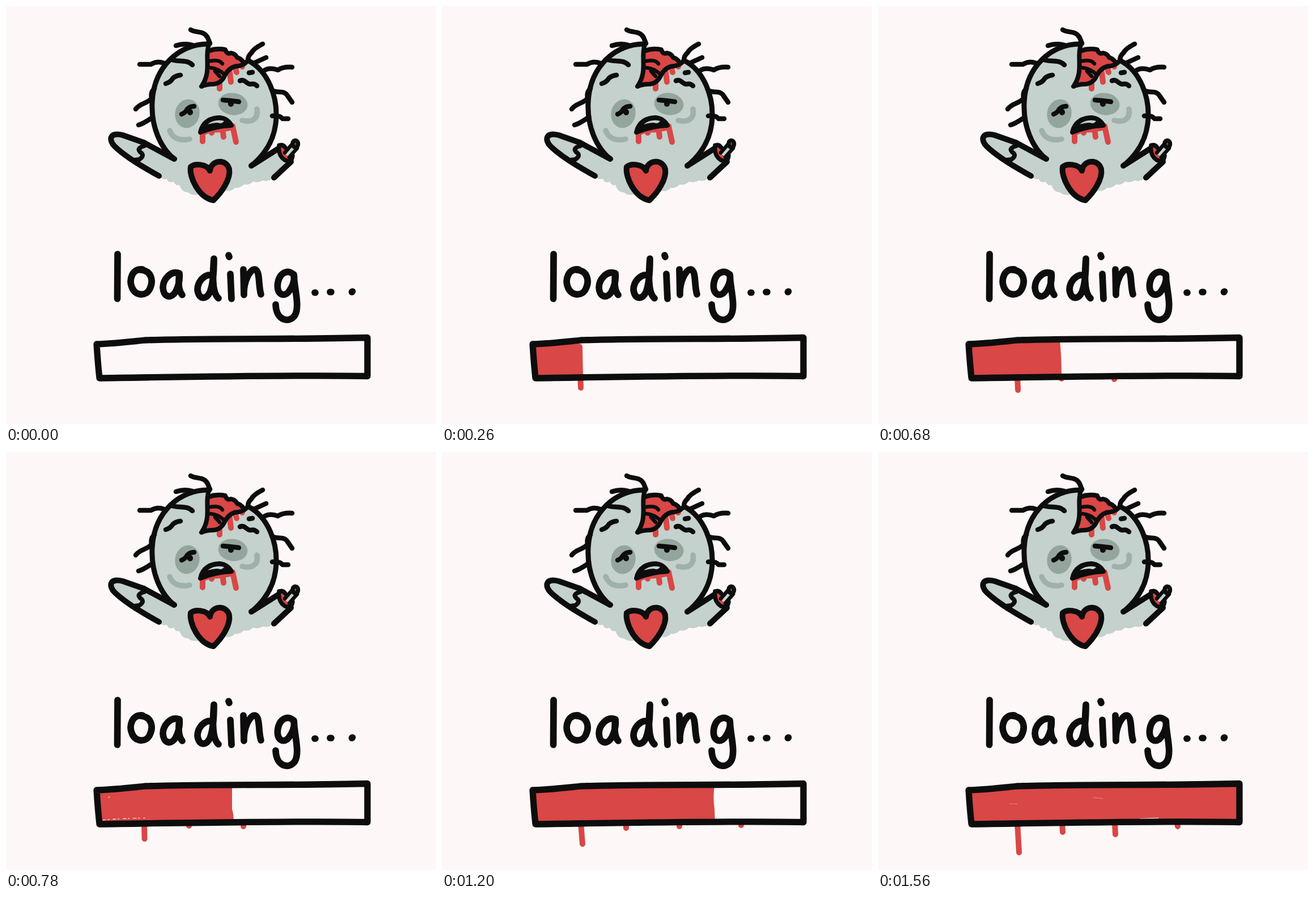
Animation, 759 px wide and 738 px high, one loop 1.82 s. Source, as an HTML page:

```html
<!DOCTYPE html>
<html lang="en">
<head>
<meta charset="utf-8">
<title>Loading</title>
<style>
  html, body { margin: 0; width: 100%; height: 100%; overflow: hidden; background: #fdf8f7; }
  svg { display: block; width: 100%; height: 100%; }
  path, ellipse { stroke-linecap: round; stroke-linejoin: round; }
  .ink { fill: none; stroke: #0d0d0d; stroke-width: 9; }
  .thin { stroke-width: 6.5; }
  .hair { stroke-width: 8.5; }
  .arm { stroke-width: 10; }
  .letters { stroke-width: 11.7; }
  .bar { stroke-width: 11.3; }
  .skin { fill: #c4d1cc; }
  .shade { fill: #94a59d; }
  .cheek { fill: none; stroke: #a0b1aa; stroke-width: 9.5; }
  .red { fill: #d94746; }
  .drip { fill: none; stroke: #d94746; stroke-width: 10; }
  .speck { fill: none; stroke: #fdf1f0; stroke-width: 1.2; }
  .step {
    visibility: hidden;
    animation: show 1820ms step-end infinite;
    animation-delay: calc(var(--i) * 260ms - 1820ms);
  }
  @keyframes show {
    0% { visibility: visible; }
    14.2857%, 100% { visibility: hidden; }
  }
</style>
</head>
<body>
<svg viewBox="0 0 759 738" role="img" aria-label="loading...">
  <!-- body and arms -->
  <path class="skin" d="M358 68C308 66 262 105 258 170C256 212 272 252 297 270L243 241L206 229C182 223 181 237 192 248C213 268 245 286 270 300
    Q276 308 284 305Q287 314 296 310Q299 318 306 316Q311 330 321 329Q328 335 338 333L366 344L388 326Q396 329 404 321Q413 322 420 315
    Q430 317 436 310Q446 313 453 308Q463 311 472 303L503 275L483 252L433 282C457 265 474 240 476 208C480 160 464 120 425 98Z"/>

  <!-- face shading -->
  <ellipse class="shade" cx="320" cy="190" rx="21.5" ry="25.5" transform="rotate(12 320 190)"/>
  <ellipse class="shade" cx="400.5" cy="173" rx="26" ry="19.5" transform="rotate(8 400 173)"/>
  <path class="cheek" d="M289 220C294 234 308 239 324 235M417 202C433 206 446 200 443 182"/>

  <!-- open skull -->
  <path class="drip" d="M377 138V146M395 116L397 134M405 110L407 117M415 104L417 107"/>
  <path class="red" d="M358 80Q372 73 388 78L406 86L424 99L410 106Q396 108 387 122Q380 138 348 141Q362 110 358 80Z"/>
  <path class="ink thin" d="M361 97Q377 94 382 102M361 109Q374 110 386 121M369 115L377 124"/>
  <path class="ink" style="stroke-width:8" d="M359 79Q372 74 387 77Q390 86 397 83Q405 84 408 91Q414 92 420 100"/>
  <path class="ink" style="stroke-width:8" d="M358 68C350 90 364 115 345 142Q354 138 364 138Q380 138 387 121Q396 106 410 106Q422 104 427 96"/>

  <!-- outlines -->
  <path class="ink" d="M358 67C308 66 261 105 258 170C256 212 272 250 297 270"/>
  <path class="ink arm" d="M297 270L243 241L206 228C182 222 181 237 192 248C213 268 245 286 270 300"/>
  <path class="ink" d="M427 96C461 113 482 160 476 208C472 240 455 264 433 282"/>
  <path class="ink arm" d="M433 282L482 251M473 303L503 275"/>
  <path class="ink" style="stroke-width:8" d="M243 240L244 247Q230 251 237 258Q246 264 235 271L227 272"/>

  <!-- torn hand -->
  <path class="red" d="M481 248Q480 268 496 274Q507 276 506 263L488 244Z"/>
  <path class="ink" style="stroke-width:7.5" d="M482 246Q480 264 492 272Q505 277 506 264M482 247Q488 243 493 250"/>
  <path class="skin" d="M491 260L503 243L513 250L500 267Z"/>
  <path class="ink thin" d="M492 259L505 244M500 267L514 251"/>
  <path class="ink" style="fill:#d94746;stroke-width:7.5" d="M506 243C506 235 516 236 515.500 244C515 252 506 251 506 243Z"/>

  <!-- hair -->
  <path class="ink hair" d="M326 42C335 48 350 43 356 56L360 66M300 70Q314 65 329 69M236 103L256 103Q267 96 279 101
    M290 94C303 100 318 93 329 104M453 67Q437 75 433 83Q427 88 427 96M459 91L437 101
    M457 113Q466 108 480 113Q489 107 505 108M472 150C482 154 492 148 498 160L505 170M470 194Q484 193 488 199L498 199
    M262 146Q255 151 257 163C249 173 237 171 229 182M234 210Q242 208 258 197"/>

  <!-- features -->
  <path class="ink hair" d="M282 137Q290 135 295 127Q300 123 308 122M413 132C422 128 425 139 432 138Q438 136 443 141M429 118L435 117"/>
  <path class="ink hair" d="M310 191Q316 189 320 182Q325 177 332 177M383 166Q397 167 411 169"/>
  <path class="ink" style="stroke-width:10" d="M325 187V188M397 172V173"/>
  <path class="drip" d="M347 226L347 239M363 220L363 224M382 216L384 231M400 212L406 240"/>
  <path class="red" d="M343 222L401 209L402 219L380 223L360 224L345 230Z"/>
  <path class="ink" style="fill:#0d0d0d;stroke-width:8" d="M343 223C347 204 362 197 377 197Q392 199 398 211Q370 212 343 223Z"/>
  <path class="skin" d="M356 209Q368 199 385 203Q381 209 374 206Q366 206 356 209Z"/>

  <path class="ink" style="fill:#d94746;stroke-width:10" d="M360 291C354 278 333 278 326 284C323 302 340 338 366 343C380 330 397 306 394 288C389 269 362 271 360 291Z"/>

  <!-- lettering -->
  <g class="ink letters">
    <path d="M197 438L196.500 517"/>
    <path d="M241 465C222 463 217 484 222 496C228 513 248 513 254 499C261 484 256 467 238 466"/>
    <path d="M306 472C290 466 277 484 277 497C278 516 293 517 300 503C305 493 307 481 306 472C304 488 304 502 311 510"/>
    <path d="M363 475C349 473 338 488 338 501C340 519 354 519 360 505C366 490 367 465 367 446C365 472 363 506 375 516"/>
    <path d="M393 440L394 443M396 473L398 517"/>
    <path d="M419 465L420 510C419 488 430 465 439 465C449 467 445 493 450 509"/>
    <path d="M508 475C501 465 484 468 480 488C476 509 491 516 500 503C507 493 510 483 508 474C509 500 519 530 510 546C501 560 477 557 476 527"/>
    <path d="M545 506L546 506M572 505L574 505M610.500 505L611.500 504"/>
  </g>

  <!-- progress -->
  <g class="step" style="--i:1">
    <path class="red" d="M161 598L242 596Q248 597 248 602L249 656H166Z"/>
    <path class="drip" d="M244 650L245 674"/>
  </g>
  <g class="step" style="--i:2">
    <path class="red" d="M161 596L245 590H321Q324 620 324 656H166Z"/>
    <path class="drip" d="M246 655L247 678M324 655V658M417 655V659"/>
  </g>
  <g class="step" style="--i:3">
    <path class="red" d="M161 596L245 590H399L399 630Q402 640 402 655H166Z"/>
    <path class="drip" d="M244 655L244.500 683M323 655V660M419 655V661"/>
    <path class="speck" stroke-dasharray="5 4 2 7" d="M171 650L176 649L214 647L245 646M181 610L183 609"/>
  </g>
  <g class="step" style="--i:4">
    <path class="red" d="M161 596L245 590L481 589Q478 610 481 630L482 655H166Z"/>
    <path class="drip" d="M245 655L248 692M325 655V664M419 655V661M528 655V659"/>
  </g>
  <g class="step" style="--i:5">
    <path class="red" d="M161 596L245 590L557 588Q562 620 555 655H166Z"/>
    <path class="drip" d="M246 655L251 699M324 655V666M418 655L419 670M528 653V656"/>
    <path class="speck" d="M317 599H319M354 598L358 597M390 599H393"/>
  </g>
  <g class="step" style="--i:6">
    <path class="red" d="M161 596L245 590L637 586V653L166 656Z"/>
    <path class="drip" d="M246 655L249 707M325 655L326 671M418 655L419 675M528 655L529 661"/>
    <path class="speck" d="M463 647.500L495 646"/>
    <path class="speck" style="stroke-width:.8;opacity:.5" d="M232 621L246 621.500M380 610L397 612"/>
  </g>

  <path class="ink bar" d="M160 597C190 596 215 593 245 590C370 586 510 589 638 585.500L638 653.500C500 651 310 655 165 657Q162 630 160 597Z"/>
</svg>
</body>
</html>
```
